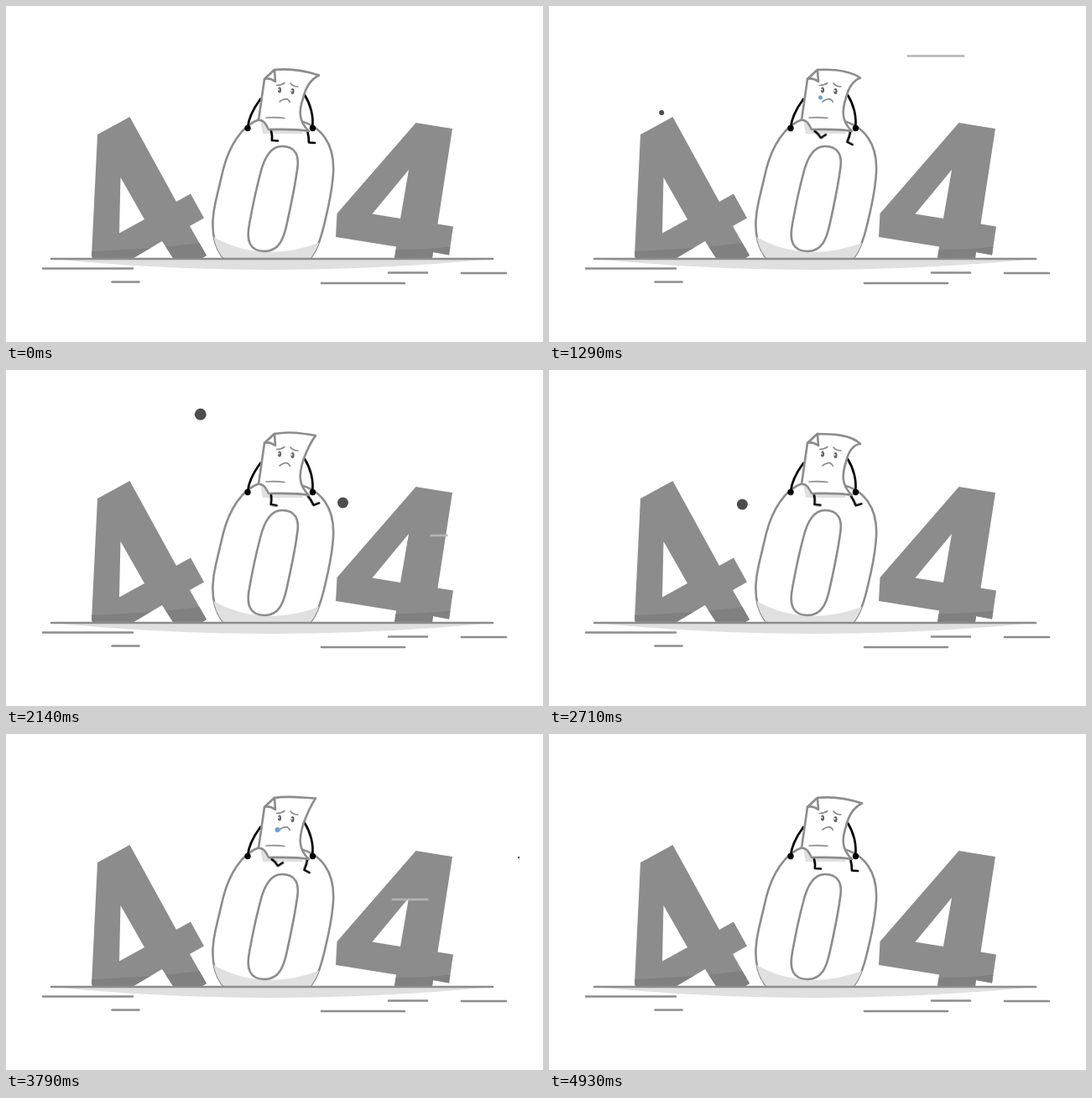
These frames come from a looping animation (640x400 px, 5000 ms). An HTML page without scripts:

```html
<!DOCTYPE html>
<html lang="en">
<head>
<meta charset="utf-8">
<title>404</title>
<style>
  html, body { margin: 0; width: 100%; height: 100%; overflow: hidden; background: #fff; }
  svg { display: block; width: 100vw; height: 100vh; }
  .solid { fill: #8c8c8c; fill-rule: evenodd; }
  .outline { fill: #fff; stroke: #8c8c8c; stroke-width: 2.6; stroke-linejoin: round; }
  .stroke { fill: none; stroke: #8c8c8c; stroke-width: 2.6; stroke-linecap: round; }
  .fine { stroke-width: 1.6; }
  .limb { fill: none; stroke: #000; stroke-width: 2.7; stroke-linecap: round; stroke-linejoin: round; }
  .shade { fill: #e0e0e0; }
  .dark { fill: #808080; }
  .dot { fill: #4d4d4d; r: 0; }

  /* Gusts: a dash that stretches, then shrinks towards the right */
  .gust { stroke: #b5b5b5; stroke-width: 2.6; stroke-dasharray: 0 600; animation: gust 5s linear infinite; }
  @keyframes gust {
    0% { stroke-dasharray: 0 600; stroke-dashoffset: 0; }
    .8% { stroke-dasharray: 32 600; stroke-dashoffset: 0; }
    4.1% { stroke-dasharray: 195 600; stroke-dashoffset: -142; }
    7.1% { stroke-dasharray: 69 600; stroke-dashoffset: -348; }
    8% { stroke-dasharray: 44 600; stroke-dashoffset: -381; }
    9.4% { stroke-dasharray: 21 600; stroke-dashoffset: -427; }
    11.2%, 100% { stroke-dasharray: 0 600; stroke-dashoffset: -481; }
  }

  /* Dots drifting behind the digits */
  .looper { animation: loop-x 5s linear infinite, loop-y 5s ease-in-out infinite, loop-r 5s linear infinite; }
  @keyframes loop-x {
    0%, 20% { cx: 110px; } 25.8% { cx: 134px; } 33% { cx: 205px; }
    40.5% { cx: 238px; } 42.8% { cx: 232px; } 45.8% { cx: 200px; animation-timing-function: ease-out; }
    49.6% { cx: 162px; animation-timing-function: ease-in; } 54.2% { cx: 230px; }
    64.2% { cx: 416px; } 68.6% { cx: 476px; } 72.4% { cx: 550px; } 75.8%, 100% { cx: 611px; }
  }
  @keyframes loop-y {
    0%, 20% { cy: 140px; } 25.8% { cy: 127px; }
    33% { cy: 202px; animation-timing-function: ease-in; }
    42.8% { cy: 53px; animation-timing-function: ease-out; }
    45.8% { cy: 40px; } 54.2% { cy: 160px; } 64.2% { cy: 103px; }
    72.4% { cy: 202px; } 75.8%, 100% { cy: 147px; }
  }
  @keyframes loop-r {
    0%, 20% { r: 0; } 25.8% { r: 3px; } 33% { r: 5px; } 42.8% { r: 7px; }
    54.2% { r: 6.5px; } 64.2% { r: 5.8px; } 75.8% { r: 1.2px; } 77%, 100% { r: 0; }
  }

  .diver { animation: dive-x 5s linear infinite, dive-y 5s ease-in-out infinite, dive-r 5s linear infinite; }
  @keyframes dive-x {
    0%, 2% { cx: 62px; } 12% { cx: 95px; } 16% { cx: 115px; } 22% { cx: 265px; }
    37% { cx: 375px; } 42.8% { cx: 401px; } 49% { cx: 562px; } 52%, 100% { cx: 572px; }
  }
  @keyframes dive-y {
    0%, 2% { cy: 252px; } 12% { cy: 238px; } 30% { cy: 220px; } 38% { cy: 277px; }
    42.8% { cy: 158px; } 49% { cy: 215px; } 52%, 100% { cy: 200px; }
  }
  @keyframes dive-r {
    0%, 2% { r: 0; } 12% { r: 3px; } 30%, 42.8% { r: 6.5px; } 49% { r: 4.5px; } 52%, 100% { r: 0; }
  }

  .riser { animation: rise 5s linear infinite; }
  @keyframes rise {
    0%, 82% { cx: 553px; cy: 253px; r: 0; }
    88% { cx: 549px; cy: 200px; r: 2.5px; }
    92% { cx: 530px; cy: 150px; r: 3px; }
    95%, 100% { cx: 505px; cy: 160px; r: 3px; }
  }

  .sheet { animation: curl 5s ease-in-out infinite; }
  @keyframes curl {
    0%, 98.6%, 100% { d: path("M320 76C338 74 356 77 373 82.5C362 88 357 97 354 110C350 122 347 136 361 149C346 146 328 147 313 147C309 139 306 135 301 136L308 87Z"); }
    8%, 75.8% { d: path("M320 76C337 73 354 76 369 76.5C362 87 358 97 354 108C350 122 347 136 361 149C346 146 328 147 313 147C309 139 306 135 301 136L308 87Z"); }
    25.8% { d: path("M320 76C338 75 358 77 371 85.5C362 89 357 97 354 109C350 122 347 136 361 149C346 146 328 147 313 147C309 139 306 135 301 136L308 87Z"); }
    42% { d: path("M320 76C337 72.5 354 75.5 369 78C362 87 358 97 354 108C350 122 347 136 361 149C346 146 328 147 313 147C309 139 306 135 301 136L308 87Z"); }
    54.2%, 93% { d: path("M320 76C338 76 360 77 371 88C362 89 357 97 354 109C350 122 347 136 361 149C346 146 328 147 313 147C309 139 306 135 301 136L308 87Z"); }
    64.2% { d: path("M320 76C338 75 358 77 370.5 84.5C362 89 357 97 354 109C350 122 347 136 361 149C346 146 328 147 313 147C309 139 306 135 301 136L308 87Z"); }
  }

  .leg { animation: left-swing 5s ease-in-out infinite; transform-origin: 316px 148px; }
  .leg.right { animation-name: right-swing; transform-origin: 360px 149px; }
  @keyframes left-swing {
    0%, 98.6%, 100% { transform: rotate(0); }
    25.4%, 75.4% { transform: rotate(-37deg); }
    46.6% { transform: rotate(9deg); }
  }
  @keyframes right-swing {
    0%, 98.6%, 100% { transform: rotate(0); }
    25.4%, 75.4% { transform: rotate(24deg); }
    46.6% { transform: rotate(-28deg); }
  }

  .tear { fill: #5fa3d9; animation: tear 5s linear infinite; }
  @keyframes tear {
    0%, 19.4% { cy: 105px; r: 0; }
    25.8% { cy: 109px; r: 2.4px; }
    31.6% { cy: 114px; r: 3px; }
    36% { cy: 122px; r: 0; }
    36.1%, 62.8% { cy: 105px; r: 0; }
    64.2% { cy: 106px; r: 1px; }
    75.8% { cy: 114px; r: 3px; }
    81%, 100% { cy: 122px; r: 0; }
  }
</style>
</head>
<body>
<svg viewBox="0 0 640 400">
  <defs>
    <path id="four-left" clip-rule="evenodd" d="M109 153L147.500 132L203 233L220 223.500L236 252.500L219 262L239 297L234 300H199L186 280L152 300H103L102 297ZM136.500 204L165 254L135 270.500Z"/>
    <path id="four-right" clip-rule="evenodd" d="M488.500 139L532 146L514.500 259.500L533 262.500L528 296.500L509 293L508 300H463L465 286.500L393 275L394.500 247ZM480 195L436.500 247.500L470 253Z"/>
    <path id="zero" d="M259 300C246 284 243 262 250 232L259 194C266 167 281 142 302 135H340C376 139 394 165 389.500 205C388 222 383 245 379 261C375 278 371 290 363 300Z"/>
    <clipPath id="in-left"><use href="#four-left"/></clipPath>
    <clipPath id="in-right"><use href="#four-right"/></clipPath>
    <clipPath id="in-zero"><use href="#zero"/></clipPath>
  </defs>

  <circle class="dot looper"/>
  <circle class="dot diver"/>
  <circle class="dot riser"/>

  <path class="shade" d="M54 301H580Q450 314 317 314T54 301Z"/>
  <use href="#four-left" class="solid"/>
  <path class="dark" clip-path="url(#in-left)" d="M100 292Q170 290 242 281V301H100Z"/>
  <use href="#four-right" class="solid"/>
  <path class="dark" clip-path="url(#in-right)" d="M460 290.500Q500 290 535 286V301H460Z"/>

  <use href="#zero" class="outline"/>
  <path class="shade" clip-path="url(#in-zero)" d="M244 273Q305 309 378 280V301H244Z"/>
  <path class="outline" d="M303 200C308 179 316 167 329 167C345 167 350 178 347 195C345 210 339 240 335 258C331 278 325 292 308 292C291 292 286 280 290 260C293 243 299 215 303 200Z"/>

  <path class="stroke" d="M54 301H580M44 312.500H151M126.500 328.500H158.500M376 330H475M456 317.500H502M543 318H596"/>

  <path class="shade" d="M303 136L306 152H354L351 147Z"/>
  <path class="limb" d="M303 111C295 122 289 133 288 145M356 106C363 117 367 132 365 145"/>
  <circle cx="288" cy="145.500" r="3.700"/>
  <circle cx="365.500" cy="145.500" r="3.700"/>
  <path class="limb leg" d="M316 149Q317.500 154 317 160L324 160.500"/>
  <path class="limb leg right" d="M359.500 150Q361 156 361 162.500L368 163"/>
  <path class="outline sheet" d="M320 76C338 74 356 77 373 82.500C362 88 357 97 354 110C350 122 347 136 361 149C346 146 328 147 313 147C309 139 306 135 301 136L308 87Z"/>
  <path class="outline" d="M308 87L320 76L321 90Q314 85 308 87Z"/>
  <path class="stroke fine" d="M310 133Q321 132 332 133.500M322.500 94.500Q328 94.500 332 91.500M339 92Q342 96 348 96M326 114Q335 107 338.500 114.500"/>
  <g fill="#666">
    <ellipse cx="326" cy="100" rx="2.100" ry="3.600"/>
    <ellipse cx="341.500" cy="101.500" rx="2.100" ry="3.600"/>
  </g>
  <g fill="#fff">
    <circle cx="325" cy="99.500" r="1"/>
    <circle cx="340.500" cy="101" r="1"/>
  </g>
  <circle class="tear" cx="323.500"/>

  <path class="gust" fill="none" d="M78 59.500H559" style="animation-delay: .935s"/>
  <path class="gust" fill="none" d="M78 197H559" style="animation-delay: 1.67s"/>
  <path class="gust" fill="none" d="M78 197H559" style="animation-delay: 3.39s"/>
</svg>
</body>
</html>
```
